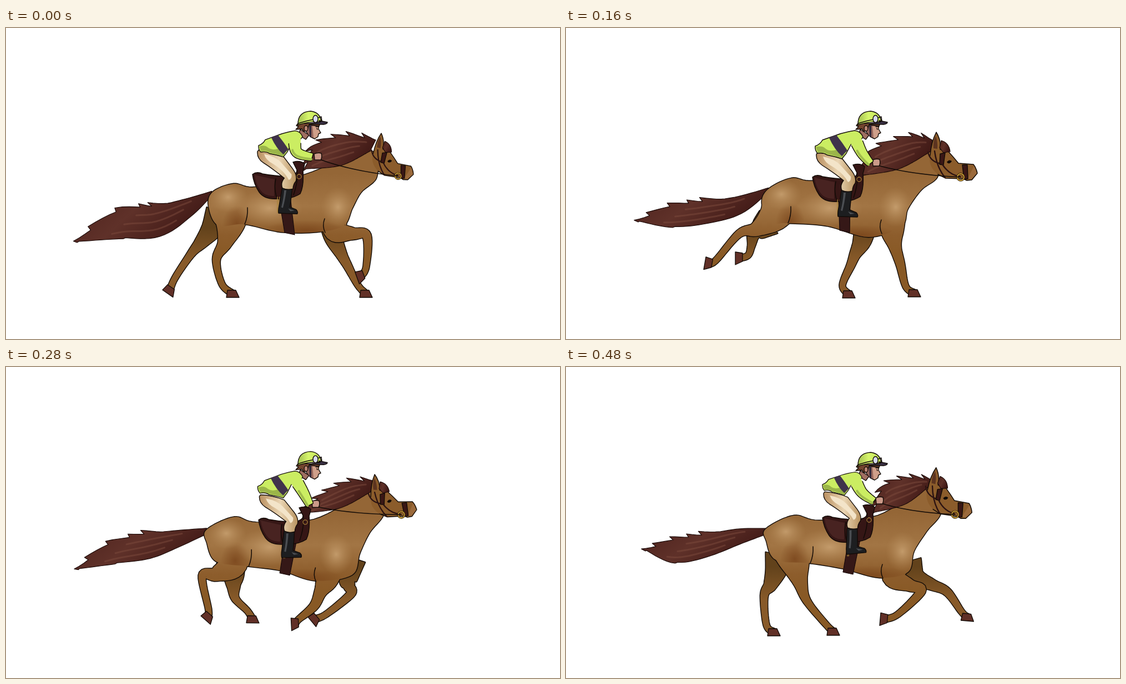
Write an HTML page that moves like this. It is 998x561 px and loops after 0.52 s.

```html
<!DOCTYPE html>
<html lang="en">
<head>
<meta charset="utf-8">
<title>Galloping horse</title>
<style>
html, body { margin: 0; width: 100%; height: 100%; overflow: hidden; background: #fff; }
svg { display: block; width: 100vw; height: 100vh; }
path, ellipse, circle { stroke-linejoin: round; stroke-linecap: round; }
.line { fill: none; stroke: #120b07; stroke-width: 1.5; }
.edge { fill: #120b07; stroke: #120b07; stroke-width: 2.8; }
.ink { stroke: #120b07; stroke-width: 1.4; }
.hair { fill: url(#hair); stroke: #1d0b09; stroke-width: 1.2; }
.strand { fill: none; stroke: #7d4a3d; stroke-width: 3; opacity: .5; }
.strap { fill: none; stroke: #2c1312; stroke-width: 2.4; }
.hoof { fill: #613027; stroke: #120b07; stroke-width: 1.3; }
</style>
</head>
<body>
<svg id="stage" viewBox="0 0 998 561">
  <defs>
    <linearGradient id="coat" gradientUnits="userSpaceOnUse" x1="0" y1="262" x2="0" y2="410">
      <stop offset="0" stop-color="#946636"/><stop offset=".4" stop-color="#a27544"/>
      <stop offset=".75" stop-color="#8d5d2c"/><stop offset="1" stop-color="#885925"/>
    </linearGradient>
    <linearGradient id="far" gradientUnits="userSpaceOnUse" x1="0" y1="360" x2="0" y2="420">
      <stop offset="0" stop-color="#62421b"/><stop offset="1" stop-color="#885a29"/>
    </linearGradient>
    <linearGradient id="hair" x1="0" y1="0" x2="1" y2=".4">
      <stop offset="0" stop-color="#4c211c"/><stop offset=".5" stop-color="#5f3129"/><stop offset="1" stop-color="#3f1815"/>
    </linearGradient>
    <linearGradient id="cloth"><stop offset="0" stop-color="#b98f60"/><stop offset=".55" stop-color="#ead5b3"/><stop offset="1" stop-color="#b8925f"/></linearGradient>
    <linearGradient id="helmet"><stop offset="0" stop-color="#a2bd50"/><stop offset=".45" stop-color="#d6f56c"/><stop offset="1" stop-color="#bfe058"/></linearGradient>
    <radialGradient id="glow"><stop offset="0" stop-color="#c9a272" stop-opacity=".85"/><stop offset="1" stop-color="#b48a58" stop-opacity="0"/></radialGradient>
    <radialGradient id="dusk"><stop offset="0" stop-color="#703912" stop-opacity=".6"/><stop offset="1" stop-color="#703912" stop-opacity="0"/></radialGradient>
    <clipPath id="inside"><path id="clip"/></clipPath>
  </defs>
</svg>
<script>
const LOOP = 520, STEP = 40;
const KEYS = [0, 80, 160, 240, 360, 400, 480];

// Each row is one key pose. Legs: six joints as x,y, then the hoof angle.
const nearHind = [
  [402,320, 404,352, 394,388, 379,418, 389,462, 408,479, 0],
  [388,318, 370,346, 336,389, 302,438, 302,462, 310,477, 0],
  [390,315, 372,342, 342,363, 312,371, 270,419, 257,425, 100],
  [395,315, 400,356, 365,369, 337,366, 332,430, 322,445, 60],
  [405,315, 418,350, 402,385, 388,412, 432,447, 450,458, 8],
  [402,312, 424,346, 412,390, 400,415, 466,434, 479,452, -4],
  [398,312, 412,352, 422,388, 434,422, 468,464, 481,477, 0]];
const farHind = [
  [385,335, 371,362, 352,386, 333,408, 305,450, 295,473, 35],
  [372,343, 345,356, 315,364, 292,371, 267,415, 250,427, 95],
  [365,350, 350,362, 338,372, 334,392, 328,410, 312,415, 90],
  [395,350, 398,375, 396,388, 400,405, 405,430, 407,446, 0],
  [418,350, 422,380, 425,405, 427,440, 472,458, 490,469, 4],
  [395,330, 390,355, 389,385, 391,415, 399,464, 416,478, 0],
  [385,340, 378,368, 368,393, 357,413, 361,465, 374,478, 0]];
const nearFore = [
  [592,335, 594,366, 625,371, 650,375, 649,430, 639,448, 70],
  [588,330, 592,358, 630,367, 662,378, 700,414, 716,427, 10],
  [588,335, 588,368, 593,395, 602,425, 612,466, 627,478, 0],
  [585,350, 574,385, 563,405, 548,430, 525,461, 520,474, 45],
  [600,350, 590,380, 586,408, 589,434, 540,438, 527,427, 165],
  [600,345, 592,378, 615,402, 624,422, 560,428, 544,414, 170],
  [600,345, 590,378, 620,394, 640,404, 598,446, 573,455, 95]];
const farFore = [
  [585,350, 590,378, 604,408, 616,430, 634,464, 648,479, 0],
  [548,355, 545,380, 546,405, 547,428, 550,464, 565,477, 0],
  [540,355, 533,385, 521,408, 513,428, 498,464, 509,480, 0],
  [620,350, 605,385, 592,400, 578,418, 532,450, 520,456, 45],
  [635,340, 630,375, 655,388, 685,394, 687,437, 676,453, 55],
  [630,350, 635,372, 660,384, 685,392, 706,428, 707,440, 4],
  [620,350, 630,378, 660,393, 687,406, 713,442, 723,451, 5]];

// Dock, croup, loin, withers, crest.
const topLine = [
  [372,296, 410,281, 450,287, 540,264, 656,222],
  [358,294, 408,274, 446,281, 538,262, 656,222],
  [364,291, 406,271, 444,276, 538,266, 658,222],
  [358,293, 408,270, 448,279, 550,272, 656,226],
  [371,294, 416,272, 456,282, 562,279, 658,222],
  [365,294, 412,267, 455,275, 552,270, 658,212],
  [360,292, 410,268, 456,277, 562,268, 658,212]];
// Jaw, throat, chest, breast, belly, belly, flank.
const underLine = [
  [668,268, 640,296, 624,325, 608,357, 560,368, 495,368, 430,354],
  [668,268, 638,291, 619,322, 605,354, 545,372, 470,356, 402,355],
  [670,266, 640,292, 616,326, 604,358, 545,377, 470,357, 400,352],
  [682,262, 655,300, 638,336, 625,370, 553,385, 490,366, 428,357],
  [675,262, 655,296, 636,334, 618,382, 565,386, 505,369, 448,363],
  [670,258, 650,296, 636,330, 620,372, 568,378, 508,364, 442,358],
  [676,260, 650,296, 627,332, 616,370, 565,380, 500,364, 440,354]];
// Spine of the tail as x, y, half width.
const tailSpine = [
  [372,297,3, 325,325,17, 270,349,28, 205,356,25, 128,387,0],
  [360,293,3, 310,320,16, 250,333,21, 190,344,20, 126,360,0],
  [366,291,3, 310,320,16, 250,333,20, 190,341,19, 130,350,0],
  [360,295,5, 300,313,18, 250,326,20, 185,338,18, 130,368,0],
  [371,296,4, 320,306,9, 268,318,29, 205,338,20, 132,351,0],
  [366,299,5, 310,302,10, 250,309,17, 190,320,15, 124,318,0],
  [362,296,5, 310,306,14, 250,323,20, 195,333,21, 143,332,0]];
const maneTop = [
  [666,202, 612,195, 558,213, 541,254],
  [662,200, 618,192, 555,217, 538,257],
  [660,202, 618,197, 555,221, 532,266],
  [662,204, 615,205, 564,228, 532,260],
  [664,208, 620,213, 578,237, 553,272],
  [662,202, 630,199, 577,224, 547,266],
  [662,205, 620,201, 574,216, 556,262]];
const headPose = [
  [705,227,7,.9], [705,228,4,.96], [704,225,0,1], [702,224,-6,.95],
  [702,230,1,.94], [699,223,9,.98], [699,222,6.5,.99]];
// Head drop, waist, elbow, wrist, hip, boot top, heel, girth, saddle shift.
const riderPose = [
  [0, 455,211, 524,224, 551,233, 453,223, 507,290, 491,334, 511,372, 0,-5],
  [0, 449,209, 530,224, 550,239, 450,222, 505,292, 489,335, 504,371, -2,-3],
  [0, 449,212, 533,225, 548,244, 451,228, 506,294, 490,340, 502,368, 0,0],
  [1, 454,214, 536,226, 547,247, 457,234, 511,298, 497,344, 502,375, 10,7],
  [5, 452,215, 536,229, 547,250, 455,232, 509,293, 496,343, 503,373, 12,6],
  [3, 454,213, 531,227, 548,245, 455,232, 508,291, 497,341, 507,370, 9,5],
  [4, 462,211, 533,226, 554,242, 464,228, 516,291, 506,338, 508,373, 18,3]];

const stage = document.getElementById("stage");
function add(tag, attrs, parent = stage) {
  const node = document.createElementNS(stage.namespaceURI, tag);
  set(node, attrs);
  return parent.appendChild(node);
}
function set(node, attrs) {
  for (const k in attrs) node.setAttribute(k, attrs[k]);
}
const shape = (cls, parent, d = "", fill) => {
  const attrs = { class: cls, d };
  if (fill) attrs.fill = fill;
  return add("path", attrs, parent);
};

// Smooth periodic interpolation without overshoot.
function sample(rows, t) {
  const n = KEYS.length;
  const i = KEYS.findLastIndex(k => k <= t);
  const time = j => KEYS[(j + n) % n] + LOOP * Math.floor(j / n);
  const h = time(i + 1) - time(i), u = (t - time(i)) / h;
  return rows[i].map((_, c) => {
    const val = j => rows[(j + n) % n][c];
    const slope = j => (val(j + 1) - val(j)) / (time(j + 1) - time(j));
    const tangent = j => {
      const a = slope(j - 1), b = slope(j);
      return a * b > 0 ? 2 * a * b / (a + b) : 0;
    };
    const p = val(i), q = val(i + 1), v = 1 - u;
    return p * (1 + 2 * u) * v * v + q * u * u * (3 - 2 * u)
      + h * u * v * (tangent(i) * v - tangent(i + 1) * u);
  });
}
const chunk = (list, size = 2) =>
  Array.from({ length: Math.floor(list.length / size) }, (_, i) => list.slice(i * size, i * size + size));

function spline(pts, closed = false, steps = 9) {
  const n = pts.length, out = [];
  const at = i => closed ? pts[(i + n) % n] : pts[Math.max(0, Math.min(n - 1, i))];
  for (let i = 0; i < (closed ? n : n - 1); i++)
    for (let s = 0; s < steps; s++) {
      const u = s / steps;
      out.push(at(i).map((p, c) => {
        const a = at(i - 1)[c], q = at(i + 1)[c], b = at(i + 2)[c];
        return p + .5 * u * (q - a + u * (2 * a - 5 * p + 4 * q - b + u * (3 * (p - q) + b - a)));
      }));
    }
  if (!closed) out.push(pts[n - 1]);
  return out;
}
const toPath = (pts, close = "Z") =>
  "M" + pts.map(p => p[0].toFixed(1) + "," + p[1].toFixed(1)).join("L") + close;
function heading(pts, i) {
  const a = pts[Math.max(0, i - 1)], b = pts[Math.min(pts.length - 1, i + 1)];
  const dx = b[0] - a[0], dy = b[1] - a[1], len = Math.hypot(dx, dy) || 1;
  return [dx / len, dy / len];
}
const offset = (pts, k) => pts.map((p, i) => {
  const [dx, dy] = heading(pts, i), w = Math.max(0, p[2]) * k;
  return [p[0] - dy * w, p[1] + dx * w];
});
const ribbon = pts => [...offset(pts, 1), ...offset(pts, -1).reverse()];
// Flame-like locks that sweep along the edge.
const locks = (edge, count, size, from = 0) => edge.map((p, i) => {
  const u = (i / (edge.length - 1) - from) / (1 - from);
  if (u <= 0 || u >= 1) return p;
  const [dx, dy] = heading(edge, i), s = size * ((u * count) % 1) ** 1.5;
  return [p[0] + s * (dx - dy * .7), p[1] + s * (dy + dx * .7)];
});
// Matrix that carries segment a-b onto segment c-d.
function fit(node, a, b, c, d) {
  const x = b[0] - a[0], y = b[1] - a[1], u = d[0] - c[0], v = d[1] - c[1], q = x * x + y * y;
  const m = (u * x + v * y) / q, n = (v * x - u * y) / q;
  set(node, { transform: `matrix(${m} ${n} ${-n} ${m} ${c[0] - m * a[0] + n * a[1]} ${c[1] - n * a[0] - m * a[1]})` });
}

function makeLeg(rows, widths, fill) {
  return { rows, widths, edge: null, body: null, hoof: null, fill };
}
const HIND = [36, 27, 13, 7, 5.5, 6], FORE = [24, 20, 11, 8, 5.5, 6];
const legs = {
  fh: makeLeg(farHind, [26, 19, 12, 7, 5.5, 6], "url(#far)"),
  ff: makeLeg(farFore, [20, 16, 10, 7.5, 5.5, 6], "url(#far)"),
  nh: makeLeg(nearHind, HIND, "url(#coat)"),
  nf: makeLeg(nearFore, FORE, "url(#coat)")
};
const HOOF = "M-11,7L12,7L6,-6L-9,-6Z";
const edgeOf = leg => leg.edge = shape("edge");
const fillOf = leg => {
  leg.body = shape("", stage, "", leg.fill);
  leg.hoof = shape("hoof", stage, HOOF);
};
for (const leg of [legs.fh, legs.ff]) { edgeOf(leg); fillOf(leg); }

const tail = shape("hair");
const tailStrands = [.5, 0, -.5].map(() => shape("strand"));
const bodyEdge = shape("edge");
edgeOf(legs.nh); edgeOf(legs.nf);
const body = shape("", stage, "", "url(#coat)");
fillOf(legs.nh); fillOf(legs.nf);
const shade = add("g", { "clip-path": "url(#inside)" });
const blob = (fill, rx, ry) => add("ellipse", { fill, rx, ry }, shade);
const bellyDusk = blob("url(#dusk)", 75, 20), rumpDusk = blob("url(#dusk)", 26, 34);
const rumpGlow = blob("url(#glow)", 36, 28), sideGlow = blob("url(#glow)", 60, 34), chestGlow = blob("url(#glow)", 30, 36);
const flankLine = shape("line"), elbowLine = shape("line");
const mane = shape("hair");
const maneStrands = [.3, .6, .85].map(() => shape("strand"));

const head = add("g", {});
const FACE = "M656,230Q658,205 667,188Q676,202 674,219L689,223Q699,234 707,244L734,246Q739,252 741,262L731,274L722,275L716,272L684,271L670,264";
shape("", head, FACE + "Q652,250 656,230Z", "#8b5c2b");
shape("line", head, FACE);
shape("", head, "M662,217Q661,204 666,195Q670,206 669,218Z", "#5c3420");
shape("hair", head, "M673,216L676,203Q690,207 692,223L680,225Z");
shape("", head, "M735,249L740,262L730,273L724,271Z", "#9b6a3c");
shape("strap", head, "M652,224Q656,240 672,244M664,222Q668,252 683,270");
shape("ink", head, "M674,227L683,225L680,247L673,246Z", "#3a1715");
shape("ink", head, "M714,247L723,247L724,272L717,273Z", "#3a1715");
shape("strap", head, "M678,246Q690,265 710,268");
shape("", head, "M686,242Q690,236 695,240Q693,245 688,244Z", "#120b07");
add("circle", { cx: 711, cy: 269, r: 6, fill: "none", stroke: "#2b1d08", "stroke-width": 3.4 }, head);
add("circle", { cx: 711, cy: 269, r: 6, fill: "none", stroke: "#c79a35", "stroke-width": 1.8 }, head);

const girth = shape("", stage, "", "#351817");
set(girth, { stroke: "#1a0b0b", "stroke-width": 1.2 });
const saddle = add("g", {});
shape("ink", saddle, "M444,269Q452,263 462,268Q488,273 512,272Q525,268 524,261L517,247Q530,243 538,250Q537,256 535,262Q537,290 530,304Q515,314 490,313Q466,315 456,301Q446,286 444,269Z", "#351615");
shape("", saddle, "M448,270Q470,275 484,278L483,308Q466,309 458,297Q449,284 448,270Z", "#482321");
shape("line", saddle, "M486,277Q482,294 488,312M524,262Q527,280 518,306");
add("circle", { cx: 528, cy: 273, r: 4, fill: "none", stroke: "#a37a36", "stroke-width": 1.3 }, saddle);
shape("", saddle, "M489,310L489,338M493,310L491,338", "none");
set(saddle.lastChild, { stroke: "#a88439", "stroke-width": 1.3 });
const rein = shape("line");

const boot = add("g", {});
shape("ink", boot, "M496,293L515,293Q513,314 511,328L523,333Q527,337 525,341L490,340Q489,334 491,325Z", "#1d1e20");
shape("", boot, "M500,297L504,297Q502,315 498,330L495,329Q499,312 500,297ZM508,331L520,335L512,336Z", "#4b4e52");
const pants = add("g", {});
shape("ink", pants, "M451,228Q450,240 462,248Q480,259 500,275Q493,284 497,293Q506,297 516,294Q516,286 521,280Q524,270 515,258Q504,244 497,235Q475,226 453,225Z", "url(#cloth)");
shape("", pants, "M463,232Q484,236 494,247L513,268Q514,276 508,278Q500,262 480,250Q466,243 463,232Z", "#f3e4c9");

const rider = add("g", {});
shape("ink", rider, "M530,183L546,193L540,201L527,193Z", "#a06f62");
shape("ink", rider, "M543,173L564,174L563,182L567,189L563,191L562,196L556,200L548,196L540,186Z", "#cf9f8a");
shape("", rider, "M541,176L552,176L554,198L547,195L540,185Z", "#96665c");
shape("ink", rider, "M526,172L523,176L527,178L522,183L533,182L537,187L543,182L546,175L564,177L566,172Z", "#73452f");
add("ellipse", { class: "ink", cx: 540.5, cy: 181, rx: 3.4, ry: 5, fill: "#b98473" }, rider);
shape("", rider, "M546,175L550,175L550,197L547,196Z", "#30283a");
shape("line", rider, "M558,178L563,178M560,181L561,183");
shape("ink", rider, "M526,175Q525,151 549,150Q566,152 568,169Q546,168 526,175Z", "url(#helmet)");
shape("ink", rider, "M564,167L579,170Q579,173 572,174Q556,173 546,174Q554,170 566,170Z", "#393044");
shape("line", rider, "M527,172Q542,167 554,165M562,162L568,160L569,168");
add("ellipse", { class: "ink", cx: 557.5, cy: 164, rx: 4.5, ry: 6.5, fill: "#d5d9ee" }, rider);

const torso = add("g", {});
shape("ink", torso, "M535,197Q531,186 520,185Q500,188 482,195L462,202Q458,210 449,213Q448,220 453,226Q464,224 470,229Q485,232 497,236L505,226L515,207L528,205Z", "#cbed62");
shape("", torso, "M450,215Q461,211 468,218Q476,224 489,219L502,229L496,235Q484,230 470,227Q464,222 454,225Z", "#9bb549");
shape("", torso, "M474,198L487,193Q498,207 507,221L497,231Q484,220 474,198Z", "#40334b");
const hand = shape("ink", stage, "M-6,-5Q1,-8 7,-6Q9,1 6,6L-5,6Z", "#cc9a89");
const armEdge = shape("edge"), arm = shape("", stage, "", "#cbed62");
const armShade = shape("", stage, "", "none");
set(armShade, { stroke: "#a1bd4c", "stroke-width": 4 });

function poseLeg(leg, t) {
  const row = sample(leg.rows, t), j = chunk(row.slice(0, 12));
  const d = toPath(ribbon(spline(j.map((p, i) => [...p, leg.widths[i]]))));
  set(leg.edge, { d });
  set(leg.body, { d });
  set(leg.hoof, { transform: `translate(${j[5]}) rotate(${row[12]})` });
  return j;
}
const centre = (node, cx, cy) => set(node, { cx, cy });

function draw(t) {
  const hind = poseLeg(legs.nh, t), fore = poseLeg(legs.nf, t);
  poseLeg(legs.fh, t);
  poseLeg(legs.ff, t);
  const [hip] = hind, [shoulder, elbow] = fore;

  const top = chunk(sample(topLine, t)), under = chunk(sample(underLine, t));
  const flank = under[6], crest = top[4];
  const d = toPath(spline([...top, ...under, [hip[0] - 20, hip[1] + 36], [hip[0] - 37, hip[1] + 2]], true));
  for (const node of [bodyEdge, body, document.getElementById("clip")]) set(node, { d });
  centre(rumpGlow, hip[0] - 2, hip[1] - 15);
  centre(rumpDusk, hip[0] + 14, hip[1] + 34);
  centre(sideGlow, 475, 325);
  centre(chestGlow, shoulder[0] + 6, shoulder[1] - 12);
  centre(bellyDusk, under[4][0] - 20, under[4][1] - 2);
  set(flankLine, { d: `M${flank[0] + 5},${flank[1] - 30}q1,16 -5,30` });
  set(elbowLine, { d: `M${elbow[0] - 20},${elbow[1] - 22}q-5,13 1,25` });

  const spine = spline(chunk(sample(tailSpine, t), 3));
  const upper = locks(offset(spine, 1), 5, 13, .35);
  const lower = locks(offset(spine, -1), 2, 3, .5);
  set(tail, { d: toPath([...upper, ...lower.reverse()]) });
  tailStrands.forEach((node, i) =>
    set(node, { d: toPath(offset(spine, .5 - i * .5).slice(7 + i * 3, 24 + i * 3), "") }));

  const ridge = spline(chunk(sample(maneTop, t)), false, 16);
  const low = ridge[ridge.length - 1];
  const base = spline([low, [(low[0] + crest[0]) / 2 + 5, (low[1] + crest[1]) / 2 + 10], crest], false, 24);
  set(mane, { d: toPath([...locks(ridge, 7, 13), ...base]) });
  maneStrands.forEach((node, k) => {
    const mix = .25 + k * .22;
    const pts = ridge.map((p, i) => base[base.length - 1 - i].map((v, c) => p[c] + (v - p[c]) * mix));
    set(node, { d: toPath(pts.slice(6 + k * 4, 34 + k * 4), "") });
  });

  const [hx, hy, turn, size] = sample(headPose, t);
  set(head, { transform: `translate(${hx} ${hy}) rotate(${turn}) scale(${size}) translate(-704 -225)` });
  const a = turn * Math.PI / 180;
  const ring = [hx + size * (7 * Math.cos(a) - 44 * Math.sin(a)), hy + size * (7 * Math.sin(a) + 44 * Math.cos(a))];

  const [drop, ...rest] = sample(riderPose, t);
  const [waist, bend, wrist, seat, cuff, heel, strap, shift] = chunk(rest);
  const gx = 501 + shift[0], gy = 308 + shift[1];
  set(girth, { d: `M${gx - 10},${gy}L${gx + 11},${gy}L${strap[0] + 9},${strap[1] + 1}L${strap[0] - 9},${strap[1] - 3}Z` });
  set(saddle, { transform: `translate(${shift})` });
  fit(boot, [506, 294], [490, 340], cuff, heel);
  fit(pants, [451, 228], [506, 294], seat, cuff);
  fit(torso, [449, 212], [525, 188], waist, [525, 188 + drop]);
  set(rider, { transform: `translate(0 ${drop})` });

  const sleeve = spline([[520, 198 + drop, 11], [...bend, 9], [...wrist, 6.5]]);
  const armPath = toPath(ribbon(sleeve));
  set(armEdge, { d: toPath(ribbon(sleeve).slice(4, -4), "") });
  set(arm, { d: armPath });
  set(armShade, { d: toPath(offset(sleeve, .6).slice(7), "") });
  const grip = [wrist[0] + 10, wrist[1] - 1];
  set(hand, { transform: `translate(${grip})` });
  set(rein, { d: `M${grip[0] + 4},${grip[1] + 5}Q${(grip[0] + ring[0]) / 2 - 10},${(grip[1] + ring[1]) / 2 + 9} ${ring}` });
}

const start = performance.now();
function tick() {
  const t = (performance.now() - start) % LOOP;
  draw(Math.floor(t / STEP) * STEP);
  requestAnimationFrame(tick);
}
tick();
</script>
</body>
</html>
```
